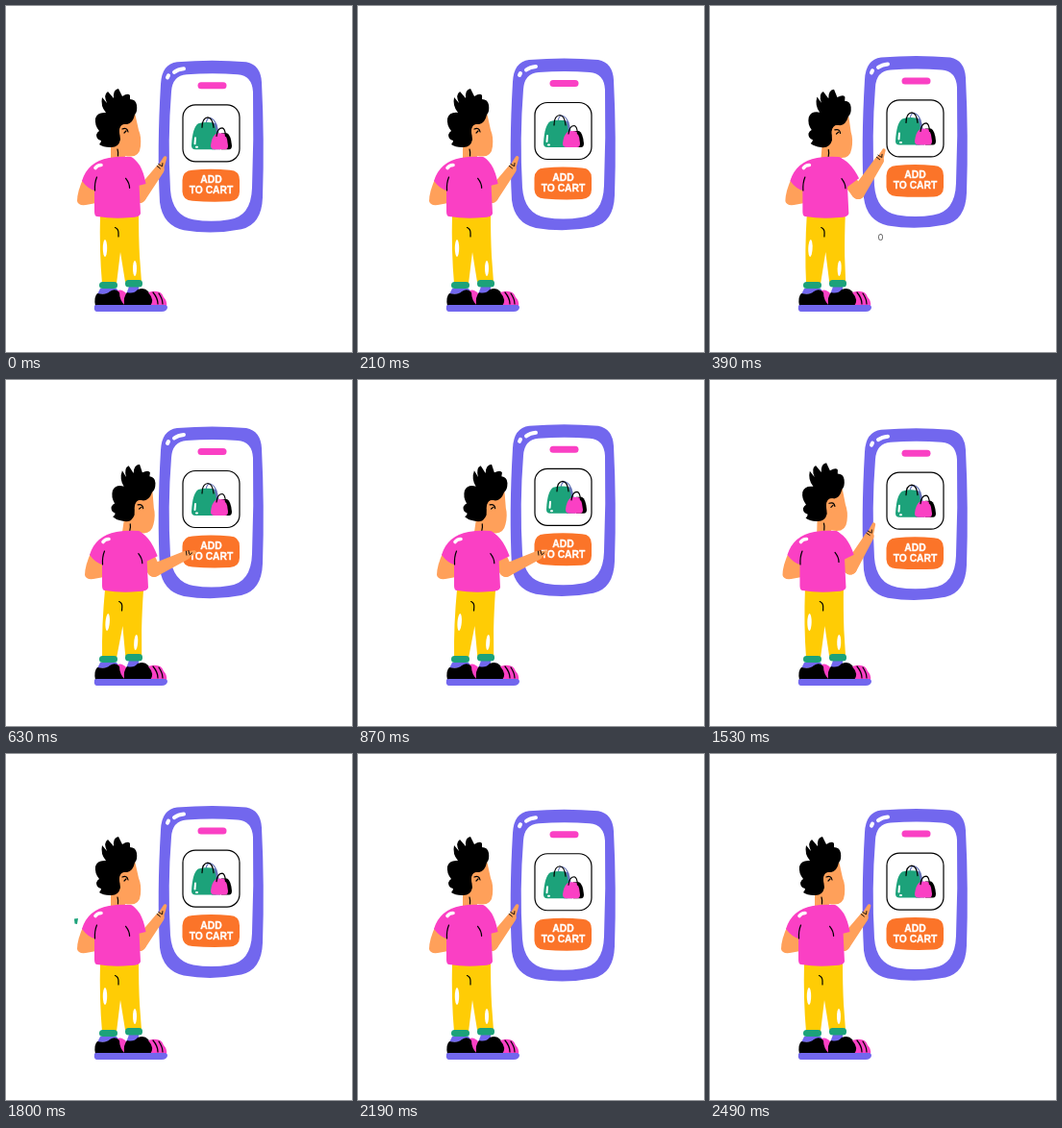
These frames come from a looping animation (360x360 px, 2520 ms). An HTML page:

```html
<!DOCTYPE html>
<html lang="en">
<head>
<meta charset="utf-8">
<title>Add to cart</title>
<style>
  html, body { margin: 0; height: 100%; overflow: hidden; background: #fff; }
  svg { display: block; width: 100vw; height: 100vh; }
  text { font: bold 10.3px "Liberation Sans", Arial, sans-serif; fill: #fff; stroke: #fff; stroke-width: .3; text-anchor: middle; }
  .skin { fill: #ffa05a; }
  .pink { fill: #fa40c4; }
  .green { fill: #1ca27a; }
  .violet { fill: #7267ee; }
  .white { fill: #fff; }
  .yellow { fill: #ffcc05; }
  .orange { fill: #fb7429; }
  .line, .shine { fill: none; stroke: #000; stroke-width: 1.2; stroke-linecap: round; stroke-linejoin: round; }
  .shine { stroke: #fff; stroke-width: 4; }
</style>
</head>
<body>
<svg viewBox="0 0 360 360">
  <g id="phone">
    <path class="violet" d="M178 59Q215 56 250 59Q265 62 266 80Q269 140 267 200Q266 228 245 233Q215 239 185 234Q163 229 160 205Q157 150 161 82Q162 61 178 59Z"/>
    <path class="white" d="M188 72Q215 70 241 72Q256 73 257 90Q258 140 256 190Q255 220 232 223Q214 226 195 223Q173 219 171 192Q168 140 172 90Q173 73 188 72Z"/>
    <path class="shine" d="M175 69.500Q179 66.500 185 66M168 75L169 73"/>
    <rect class="pink" x="199.500" y="80" width="30" height="7" rx="3.500"/>
    <rect class="line" x="184" y="103.500" width="59" height="59" rx="13"/>
    <g id="bags">
      <path fill="#6474b8" d="M214 122L219 123Q222 130 223 150H214Z"/>
      <path class="line" d="M208 123Q209 117 212 117Q217 118 219 125" style="stroke:#6474b8"/>
      <path class="green" d="M200 123Q207 121 214 122Q217 123 218 128L221 146Q221 150 217 150H197Q193 150 193 146Q194 127 200 123Z"/>
      <path class="line" d="M204 127Q204 117 210 116.500Q215 117 216 127"/>
      <path d="M224 133H230Q234 135 235 146Q235 150 232 150H224Z"/>
      <path class="pink" d="M218 134Q223 132 228 134Q230.500 139 231 146Q231 150 228 150H217Q213 150 213 146Q214 137 218 134Z"/>
      <path class="line" d="M219 136Q220 127.500 225 127.500Q228 128 228.500 136"/>
      <path class="shine" d="M197 138L196.500 144M198 147.500H199" style="stroke-width:2"/>
    </g>
    <path class="orange" d="M194 171.500Q213 169.500 233 171.500Q243 172 243 182V194Q243 203 233 204Q213 205 194 203.500Q184 203 183.500 194V182Q184 172 194 171.500Z"/>
    <text x="213.500" y="185">ADD</text>
    <text x="213.500" y="196">TO CART</text>
  </g>

  <g id="sparks" class="orange"></g>
  <rect id="ring" class="line" x="175.500" y="237.500" width="4" height="6" rx="2" style="stroke:#666;stroke-width:1"/>
  <path id="chip" class="green" d="M71 171.500L75 171L74 177L71.500 176.500Z"/>

  <g id="legs">
    <path class="yellow" d="M98 216H138Q138 240 139 260L141 287H124L119 256L115 289H100Q97 255 98 216Z"/>
    <path class="line" d="M113.500 230.500Q117 232 117 236V240"/>
    <ellipse class="white" cx="103" cy="252" rx="2.200" ry="9"/>
    <ellipse class="white" cx="134" cy="273" rx="2" ry="8"/>
  </g>

  <g id="feet">
    <path class="violet" d="M95 300L98 294H115L119 299ZM125 300L128 292H138V298Z"/>
    <path class="pink" d="M114 297Q120 293 125 299V312H114Z"/>
    <rect class="green" x="97" y="287" width="19" height="7" rx="3.500"/>
    <rect class="green" x="124" y="285" width="18" height="7.500" rx="3.500"/>
    <path d="M93 312Q91 303 95 299Q104 301 108 297Q114 293 118 298Q118 306 124 312Z"/>
    <path d="M123 312Q122 302 126 298Q133 300 137 295Q144 292 148 297Q151 303 166 312Z"/>
    <path class="pink" d="M148 298Q161 294 164 303Q168 307 167 312H150Q155 306 148 298Z"/>
    <path class="line" d="M153 298Q158 304 158 310M159 299Q163 305 163 310"/>
    <path class="violet" d="M92 312Q92 311 95 311H165Q168 311 168 314Q167 318 162 318H95Q91 318 92 312Z"/>
  </g>

  <g id="head">
    <path class="skin" d="M109 144V161H123L124 156Q139 159 140 146Q141 136 138 129L134 111L118 118Z"/>
    <path d="M119 139Q117 148 108 147Q101 147 97 144Q99 142 99 140Q94 139 94 134Q95 131 97 130Q92 124 93 117Q95 110 104 111Q98 104 100 95L105 101Q101 92 106 89L112 96Q111 87 117 86L121 94Q127 90 129 93V97Q135 97 136 103Q137 110 134 113Q132 122 126 123Q119 122 118 130Z"/>
    <path class="skin" d="M118 129Q119 122 125 123Q132 125 130 131Q128 138 122 137Q118 136 118 129Z"/>
    <path class="line" d="M121 128Q126 126 127 131M123 132L125 130"/>
    <path class="line" d="M116 149Q117 152 116.500 156"/>
  </g>

  <g id="arm">
    <path id="upper" class="skin"/>
    <path id="fore" class="skin"/>
    <path id="finger" class="skin"/>
    <path id="knuckles" class="line" style="stroke-width:.9"/>
    <path id="sleeve" class="pink"/>
  </g>

  <g id="torso">
    <path class="skin" d="M81 178Q74 193 74 203Q75 208 83 207L94 205V180Z"/>
    <path class="pink" d="M107 158Q118 156 130 157Q137 159 138 175L140 216Q139 220 130 220Q112 222 95 219Q92 219 92 214V192Q85 190 79 182Q85 162 107 158Z"/>
    <path class="line" d="M94.500 178Q92 184 92.500 192"/>
    <path class="shine" d="M93 168.500Q95 165.500 99 165.500" style="stroke-width:3.600"/>
  </g>
  <path id="seam" class="line"/>
</svg>
<script>
const LOOP = 2520;
const $ = id => document.getElementById(id);
const set = (id, name, value) => $(id).setAttribute(name, value);
const show = (id, on) => set(id, 'visibility', on ? 'visible' : 'hidden');
const ramp = (t, from, to) => Math.min(1, Math.max(0, (t - from) / (to - from)));
const smooth = x => x * x * (3 - 2 * x);
const mix = (a, b, k) => a.map((v, i) => v + (b[i] - v) * k);
const add = (a, n, k) => [a[0] + n[0] * k, a[1] + n[1] * k];

// Arm joints: resting, halfway, pressing
const joints = {
  shoulder: [[132, 170], [136, 170], [141, 170]],
  elbow: [[139, 198], [153.5, 194], [154, 198]],
  hand: [[160, 170], [175, 160], [187, 182.5]],
  tip: [[165.5, 158], [179.500, 149], [196, 179]]
};

// Inner and outer end of each spark
const sparks = [
  [[266.500, 47], [269, 20]],
  [[286, 57], [310, 41]],
  [[286, 86.500], [310, 95]]
];
sparks.forEach(() => $('sparks').append(document.createElementNS('http://www.w3.org/2000/svg', 'ellipse')));

// Quadratic curve through three poses
function pose([a, m, b], k) {
  return a.map((v, i) => v * (1 - k) * (1 - 2 * k) + 4 * m[i] * k * (1 - k) + b[i] * k * (2 * k - 1));
}

function normal(a, b) {
  const dx = b[0] - a[0], dy = b[1] - a[1], len = Math.hypot(dx, dy);
  return [dy / len, -dx / len];
}

function taper(a, ra, b, rb) {
  const n = normal(a, b);
  return `M${add(a, n, ra)}L${add(b, n, rb)}A${rb} ${rb} 0 0 1 ${add(b, n, -rb)}` +
    `L${add(a, n, -ra)}A${ra} ${ra} 0 0 1 ${add(a, n, ra)}Z`;
}

function drawArm(k) {
  const [shoulder, elbow, hand, tip] = Object.values(joints).map(j => pose(j, k));
  set('upper', 'd', taper(shoulder, 7, elbow, 7));
  set('fore', 'd', taper(elbow, 7, hand, 4.8));
  set('finger', 'd', taper(hand, 3.8, tip, 1.8));

  const across = normal(hand, tip), along = [-across[1], across[0]];
  const at = (u, v) => add(add(hand, along, u), across, v);
  set('knuckles', 'd', `M${at(1, 0)}L${at(2, 4)}M${at(4, 0)}L${at(4.5, 3.5)}M${at(7, 0)}L${at(4, -1)}`);

  const cuff = mix(shoulder, elbow, .62), n = normal(shoulder, elbow);
  const inner = add(cuff, n, -8), shift = 8 * k;
  set('sleeve', 'd', `M${115 + shift} 157H${128 + shift}Q${141 + shift} 160 ${add(cuff, n, 9.500)}L${inner}L${115 + shift} 190Z`);
  set('seam', 'd', `M${add(inner, [-.4, -1], 10)}Q${add(inner, [0, -1], 5)} ${inner}`);
}

function drawSparks(t) {
  const head = ramp(t, 1030, 1290), tail = ramp(t, 1190, 1450);
  show('sparks', head > tail);
  sparks.forEach(([from, to], i) => {
    const a = mix(from, to, tail), b = mix(from, to, head), c = mix(a, b, .5);
    const dx = b[0] - a[0], dy = b[1] - a[1], spark = $('sparks').children[i];
    spark.setAttribute('rx', Math.hypot(dx, dy) / 2);
    spark.setAttribute('ry', 3);
    spark.setAttribute('transform', `translate(${c}) rotate(${Math.atan2(dy, dx) * 180 / Math.PI})`);
  });
}

function draw(t) {
  const lean = smooth(ramp(t, 200, 560)) - smooth(ramp(t, 1270, 1630));
  const float = 6 * Math.cos(2 * Math.PI * (t - 2280) / LOOP) - 5.6;
  const nudge = 3 * Math.sin(Math.PI * ramp(t, 700, 1040));
  const skew = .07 * lean;
  set('phone', 'transform', `translate(0 ${float})`);
  set('bags', 'transform', `translate(${nudge} 0)`);
  set('legs', 'transform', `matrix(1 0 ${-skew} 1 ${290 * skew} 0)`);
  set('torso', 'transform', `translate(${8 * lean} 0)`);
  set('head', 'transform', `translate(${12 * lean} ${lean}) rotate(${8 * lean} 117 158)`);
  drawArm(lean);
  drawSparks(t);
  show('ring', t >= 330 && t < 450);
  show('chip', t >= 1680 && t < 2180);
}

function frame(now) {
  draw(now % LOOP);
  requestAnimationFrame(frame);
}
frame(performance.now());
</script>
</body>
</html>
```
